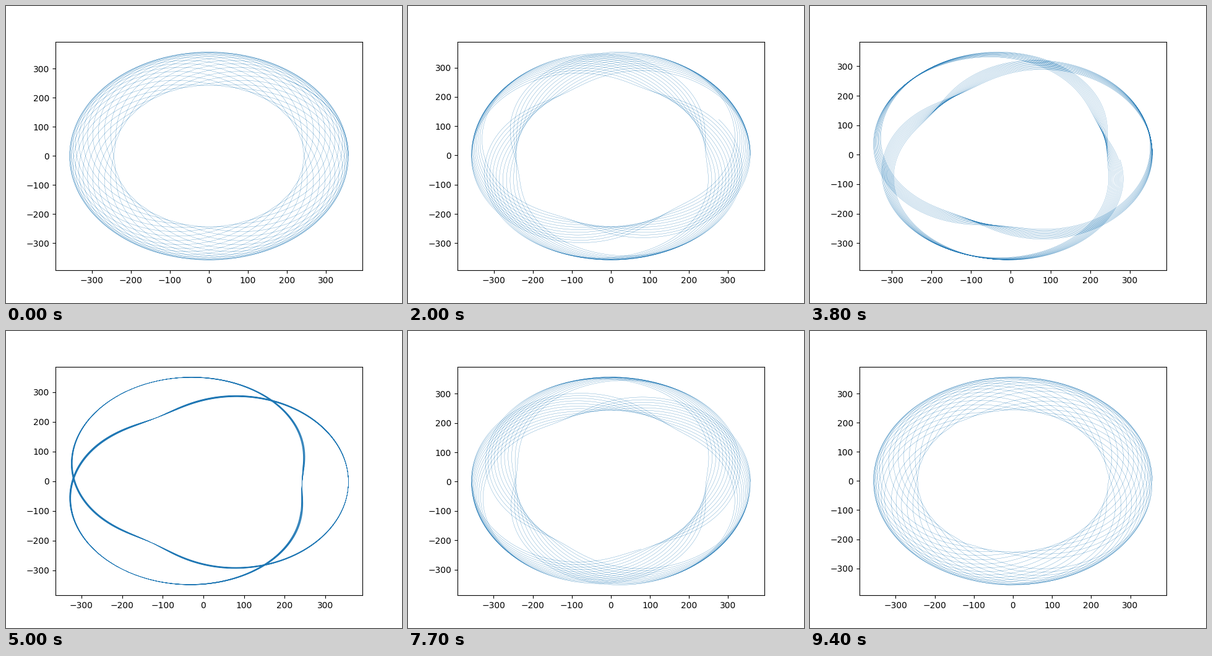
Recreate the animation shown at these times as a matplotlib script. Size 640x480 px, loop 9500 ms.

```python
import numpy as np
import matplotlib.pyplot as plt
from matplotlib.animation import FuncAnimation

FRAMES = 95
INTERVAL = 100              # ms
RING = 200.0                # fixed circle radius
WHEEL = 142.5               # rolling circle radius at the start
WHEEL_STEP = 0.7 / FRAMES   # growth of the rolling circle per frame
ARM = 300.0                 # pen distance from the wheel's centre

t = np.linspace(0, 360, 9001)


def spirograph(wheel):
    gap = RING - wheel
    turn = gap / wheel * t
    x = gap * np.cos(t) + ARM * np.cos(turn)
    y = gap * np.sin(t) + ARM * np.sin(turn)
    return x, y


fig, ax = plt.subplots(figsize=(6.4, 4.8), dpi=100)
line, = ax.plot([], [], color="C0", linewidth=0.2)


def update(frame):
    line.set_data(*spirograph(WHEEL + WHEEL_STEP * frame))
    ax.relim()
    ax.autoscale_view()
    return line,


anim = FuncAnimation(fig, update, frames=FRAMES, init_func=lambda: update(0),
                     interval=INTERVAL, repeat=True, repeat_delay=0)
plt.show()
```
